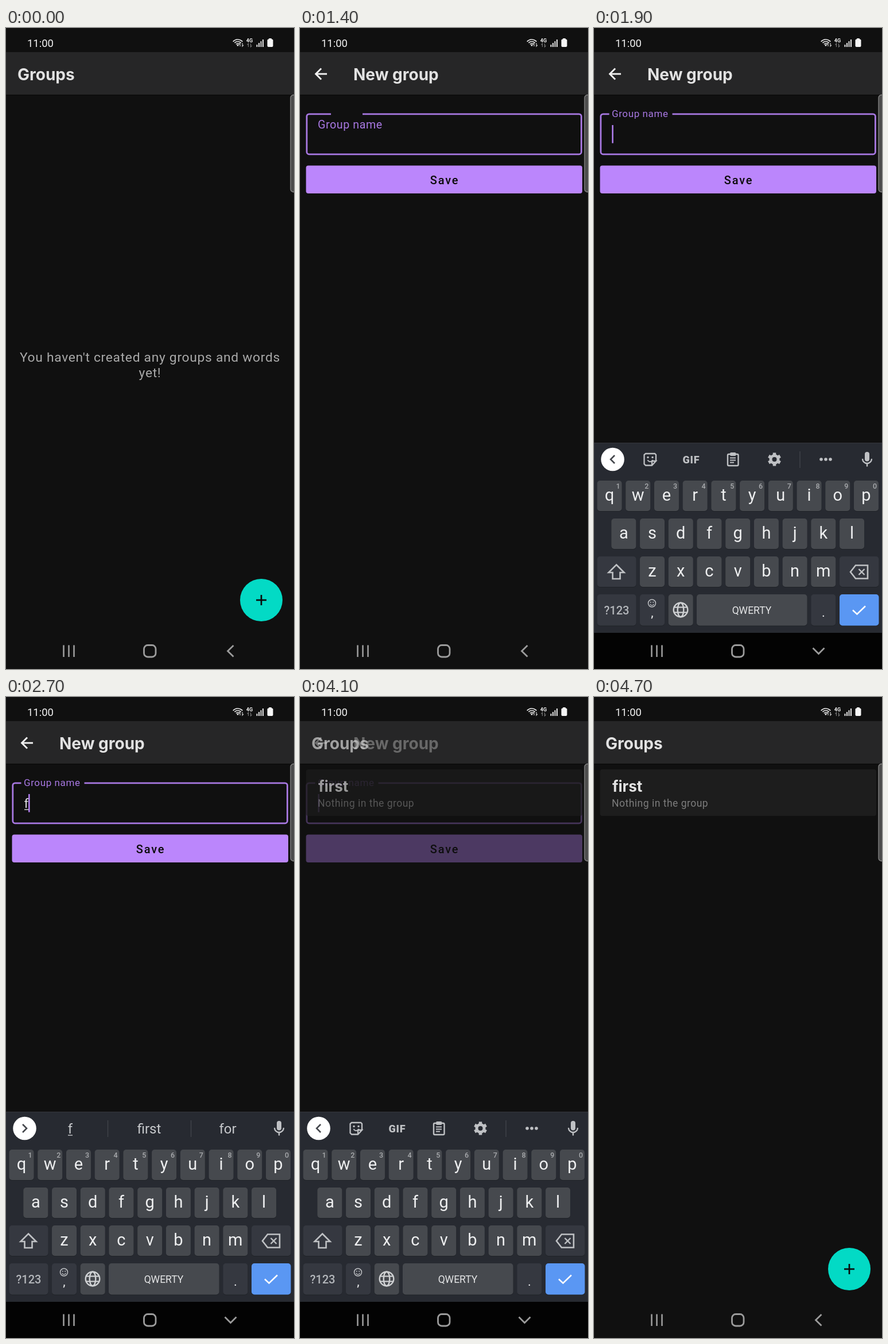
Recreate the animation shown at these times as an HTML page with a canvas. Size 502 by 1116 pixels, loop 5700 ms.

```html
<!DOCTYPE html>
<html lang="en">
<head>
<meta charset="utf-8">
<title>Groups</title>
<style>
html, body { margin: 0; width: 502px; height: 1116px; overflow: hidden; background: #101010; }
canvas { display: block; }
</style>
</head>
<body>
<canvas id="stage" width="502" height="1116"></canvas>
<script>
const W = 502, H = 1116, LOOP = 5700, STEP = 100;
const ROBOTO = 'Roboto, "Open Sans", sans-serif';
const INTER = 'Inter, Roboto, sans-serif';
const PURPLE = '#bb86fc', ICON = '#bfc1c4';
const screen = document.getElementById('stage').getContext('2d');
const buffer = document.createElement('canvas');
buffer.width = W;
buffer.height = H;
const layerCtx = buffer.getContext('2d');
let g = screen;

// Value at time t between [time, value] points.
function track(t, points) {
  let [t0, v0] = points[0];
  for (const [t1, v1] of points) {
    if (t < t1) return t <= t0 ? v0 : v0 + (v1 - v0) * (t - t0) / (t1 - t0);
    t0 = t1;
    v0 = v1;
  }
  return v0;
}

// Draw a group at one opacity, so overlapping parts blend as a whole.
function layer(alpha, dy, draw) {
  if (alpha <= 0) return;
  g = layerCtx;
  g.clearRect(0, 0, W, H);
  draw();
  g = screen;
  g.globalAlpha = alpha;
  g.drawImage(buffer, 0, dy);
  g.globalAlpha = 1;
}

function box(x, y, w, h, r, color) {
  g.beginPath();
  g.roundRect(x, y, w, h, r);
  g.fillStyle = color;
  g.fill();
}

function frameBox(x, y, w, h, r, color, width) {
  g.beginPath();
  g.roundRect(x, y, w, h, r);
  g.strokeStyle = color;
  g.lineWidth = width;
  g.stroke();
}

function disc(x, y, r, color) {
  g.beginPath();
  g.arc(x, y, r, 0, 7);
  g.fillStyle = color;
  g.fill();
}

function arc(x, y, r, color, width, from = 0, to = Math.PI * 2) {
  g.beginPath();
  g.arc(x, y, r, from, to);
  g.strokeStyle = color;
  g.lineWidth = width;
  g.stroke();
}

function line(points, color, width, closed) {
  g.beginPath();
  for (let i = 0; i < points.length; i += 2) g.lineTo(points[i], points[i + 1]);
  if (closed) g.closePath();
  g.strokeStyle = color;
  g.lineWidth = width;
  g.stroke();
}

function text(str, x, y, size, color, { weight = 400, font = ROBOTO, align = 'left', gap = 0 } = {}) {
  g.font = `${weight} ${size}px ${font}`;
  g.letterSpacing = gap + 'px';
  g.textAlign = align;
  g.fillStyle = color;
  g.fillText(str, x, y);
  return g.measureText(str).width;
}

const center = { align: 'center' };
const heading = { weight: 700, font: INTER };

function statusBar() {
  text('11:00', 37, 33, 18.4, '#f2f2f2');
  for (const r of [4, 7.5, 11]) arc(404, 31, r, '#e6e6e6', 1.7, -Math.PI * 0.77, -Math.PI * 0.23);
  disc(404, 30, 1.6, '#e6e6e6');
  const arrows = (x, y, color) => {
    line([x, y + 6, x, y, x - 2, y + 2.3], color, 1.2);
    line([x + 4, y, x + 4, y + 6, x + 6, y + 3.7], color, 1.2);
  };
  arrows(408, 26, '#c8c8c8');
  text('4G', 424.5, 25, 9, '#f2f2f2', { weight: 700, align: 'center' });
  arrows(422.5, 27, '#777');
  for (let i = 0; i < 4; i++) {
    const h = 4 + i * 3;
    box(436.5 + i * 3.5, 33 - h, 2, h, 0, '#e6e6e6');
  }
  box(455.5, 19.5, 10, 13.5, 2, '#f6f6f6');
  box(458, 18, 5, 3, 1, '#f6f6f6');
}

function edgeHandle() {
  box(496, 116.5, 14, 169, 5, '#4c4c4c');
  frameBox(496, 116.5, 14, 169, 5, '#858585', 1.3);
}

function navBar(down) {
  const c = '#9c9c9c';
  for (const x of [100.5, 109.5, 118.5]) line([x, 1074.5, x, 1095], c, 2.6);
  frameBox(240.5, 1074.5, 20.5, 20.5, 6.5, c, 2.8);
  line(down ? [381.5, 1079.5, 391.5, 1089.5, 401.5, 1079.5]
            : [396.5, 1075, 386.5, 1084.7, 396.5, 1094.5], c, 2.8);
}

function groupsPage(filled) {
  text('Groups', 20, 91, 28, '#e2e2e2', heading);
  if (filled) {
    box(10.5, 126, 481.5, 81, 4, '#1d1d1d');
    text('first', 32, 165, 26, '#e2e2e2', heading);
    text('Nothing in the group', 31, 191, 17.5, '#7c7c7c', { gap: 0.5 });
  } else {
    const opts = { align: 'center', gap: 0.71 };
    text("You haven't created any groups and words", 251, 580.5, 22.8, '#a9a9a9', opts);
    text('yet!', 251, 607.5, 22.8, '#a9a9a9', opts);
  }
  disc(445, 996, 37, '#03dac5');
  line([436, 996, 454, 996], '#0a0a0a', 2.7);
  line([445, 987, 445, 1005], '#0a0a0a', 2.7);
}

function newGroupPage(focus, value, cursor) {
  line([27, 80, 47, 80], '#f2f2f2', 2.9);
  line([37, 70.5, 27.5, 80, 37, 89.5], '#f2f2f2', 2.9);
  text('New group', 93, 91, 28, '#e2e2e2', heading);

  const tint = focus > 0 ? '#a878e2' : '#8b8b8b';
  if (focus > 0) frameBox(11.8, 149.8, 478.6, 70, 4, tint, 2.8);
  else frameBox(11, 148.8, 480, 72, 5, '#757575', 1.2);
  if (focus > 0) {
    const half = 55 * focus;
    box(81.5 - half, 146, half * 2, 8, 0, '#101010');
  }
  text('Group name', 31, 194 - 39 * focus, 22.2 - 5.2 * focus, tint, { gap: 0.6 });

  let end = 32.5;
  if (value) {
    const w = text(value, 31.5, 193, 22.2, '#dcdcdc', { gap: 0.6 });
    if (value === 'f') line([32, 196, 40, 196], '#dcdcdc', 1.4);
    end = 32 + w;
  }
  if (cursor) line([end, 169, end, 200.5], PURPLE, 2.4);

  box(10.5, 239.5, 481.5, 48.5, 4, PURPLE);
  text('Save', 252, 272, 20, '#0c0c0c', { weight: 500, align: 'center', gap: 1.78 });
}

function mic() {
  box(472, 738, 8, 16.5, 4, ICON);
  arc(476, 750, 8, ICON, 2.3, 0, Math.PI);
  line([476, 758, 476, 763.5], ICON, 2.4);
}

function toggle(dir) {
  disc(32.5, 751, 20.3, '#fff');
  line([32.5 - dir * 3.5, 744, 32.5 + dir * 3.5, 751, 32.5 - dir * 3.5, 758], '#44474c', 2.6);
}

function toolbar() {
  toggle(-1);
  line([108, 754, 108, 743, 106, 741, 90, 741, 87.5, 743, 87.5, 759, 90, 761.5, 101, 761.5, 108, 754, 101, 754, 101, 761.5], ICON, 2.3);
  disc(94, 747.5, 1.7, ICON);
  disc(102, 747.5, 1.7, ICON);
  arc(98, 750, 5, ICON, 2, 0.4, 2.7);
  text('GIF', 169.5, 757.5, 18, ICON, { weight: 900, align: 'center', gap: 0.8 });
  frameBox(233, 742, 18.5, 20, 2, ICON, 2.4);
  box(237, 739, 10.5, 6, 2, ICON);
  for (const [y, w] of [[748.5, 10], [752.5, 10], [756.5, 7]]) line([237, y, 237 + w, y], ICON, 2);
  for (let i = 0; i < 6; i++) {
    const a = i * Math.PI / 3 + Math.PI / 6, c = Math.cos(a), s = Math.sin(a);
    line([314.5 + c * 6, 751 + s * 6, 314.5 + c * 11.5, 751 + s * 11.5], ICON, 5.5);
  }
  arc(314.5, 751, 6.5, ICON, 5);
  line([359, 737, 359, 766], '#41444a', 1.4);
  for (const x of [396, 404, 412]) disc(x, 751, 2.8, ICON);
  mic();
}

function suggestions() {
  toggle(1);
  for (const x of [177.5, 322.5]) line([x, 737, x, 766], '#41444a', 1.4);
  [['f', 112], ['first', 249.5], ['for', 386.5]].forEach(([word, x]) =>
    text(word, x, 760, 24, '#c6c8cb', center));
  line([108, 763, 116, 763], '#c6c8cb', 1.4);
  mic();
}

function key(x, y, w, color, label, h = 53) {
  box(x, y + 1, w, h, 5, '#1f2227');
  box(x, y, w, h, 5, color);
  if (label) text(label, x + w / 2, y + 35, 29, '#eeeff0', center);
}

const digits = [...'1234567890'];

function keyboard(strip, settled) {
  const pitch = 49.72, plain = '#46494e', special = '#353840';
  box(0, 722, W, H, 0, '#272a31');
  line([0, 722.5, W, 722.5], '#34373d', 1);
  if (strip === 'digits') {
    digits.forEach((d, i) => text(d, 26.5 + i * pitch, 762, 29, '#eeeff0', center));
  } else if (strip === 'words') suggestions();
  else toolbar();

  [['qwertyuiop', 5.5, 788], ['asdfghjkl', 30.3, 854], ['zxcvbnm', 80, 920]].forEach(([row, x, y]) =>
    [...row].forEach((c, i) => key(x + i * pitch, y, 43, plain, c)));
  if (strip !== 'digits') {
    digits.forEach((d, i) => text(d, 42 + i * pitch, 802, 12.5, '#a9abae', { weight: 500, align: 'center' }));
  }

  key(5.5, 920, 68, special);
  line([39, 934.5, 52.5, 948, 45.5, 948, 45.5, 959, 32.5, 959, 32.5, 948, 25.5, 948], ICON, 2.6, true);
  key(428, 920, 68.5, special);
  line([447, 947, 456, 935.5, 477, 935.5, 477, 958.5, 456, 958.5], ICON, 2.6, true);
  line([461.5, 942, 471.5, 952], ICON, 2.4);
  line([471.5, 942, 461.5, 952], ICON, 2.4);

  const y = 986, h = 54.5;
  key(5.5, y, 68, special, '', h);
  text('?123', 39.5, 1021, 20, '#b4b7bb', { weight: 500, align: 'center' });
  key(80, y, 43, special, '', h);
  arc(101, 1001.5, 6.5, ICON, 1.5);
  disc(98.8, 999.8, 1, ICON);
  disc(103.2, 999.8, 1, ICON);
  arc(101, 1001.8, 3.5, ICON, 1.3, 0.3, 2.84);
  text(',', 101.5, 1025, 22, '#eeeff0', center);
  key(129.7, y, 43, plain, '', h);
  arc(151, 1013, 12.3, '#d0d2d4', 2.4);
  g.beginPath();
  g.ellipse(151, 1013, 5.3, 12.3, 0, 0, 7);
  g.stroke();
  for (const dy of [-4.5, 4.5]) line([140, 1013 + dy, 162, 1013 + dy], '#d0d2d4', 2.2);
  key(179, y, 192.5, plain, '', h);
  text('QWERTY', 275, 1020, 17.5, '#e4e5e6', center);
  key(378.3, y, 43, special, '', h);
  text('.', 400, 1025, 22, '#eeeff0', center);
  key(428, y, 68.5, '#5a97f3', '', h);
  line([451, 1013.5, 458.5, 1020.5, 473, 1006.5], '#fff', 2.5);
  if (settled) box(0, 1053, W, 70, 0, '#030303');
}

function draw(t) {
  g = screen;
  const saved = t >= 3900;
  const opened = track(t, [[400, 0], [500, 0.5], [600, 0.93], [700, 1]]);
  const closed = track(t, [[3900, 0], [4000, 0.2], [4100, 0.65], [4200, 0.94], [4300, 1]]);
  const edit = saved ? 1 - closed : opened;
  const focus = track(t, [[1300, 0], [1400, 0.5], [1500, 1]]);
  const value = saved || t < 2700 ? '' : t < 3300 ? 'f' : 'first';
  const cursor = t >= 1500 && !(t >= 2400 && t < 2700);

  box(0, 0, W, H, 0, '#101010');
  box(0, 42, W, 74, 0, '#262627');
  box(0, 116, W, 1.5, 0, '#0b0b0b');
  layer(edit, 0, () => newGroupPage(focus, value, cursor));
  layer(1 - edit, 0, () => groupsPage(saved));
  statusBar();
  edgeHandle();

  const drop = t < 3000
    ? track(t, [[1400, 331], [1500, 124], [1600, 28], [1700, 0]])
    : track(t, [[4400, 0], [4500, 28], [4600, 150], [4700, 394]]);
  const shown = t < 3000
    ? track(t, [[1400, 0], [1500, 0.68], [1600, 0.94], [1700, 1]])
    : track(t, [[4400, 1], [4500, 0.9], [4600, 0.45], [4700, 0]]);
  const strip = t < 1700 ? 'digits' : t >= 2700 && t < 3300 ? 'words' : 'tools';
  layer(shown, drop, () => keyboard(strip, drop === 0));
  navBar(shown > 0);
}

const start = performance.now();
function tick() {
  const t = (performance.now() - start) % LOOP;
  draw(Math.floor(t / STEP) * STEP);
  requestAnimationFrame(tick);
}
tick();
</script>
</body>
</html>
```
